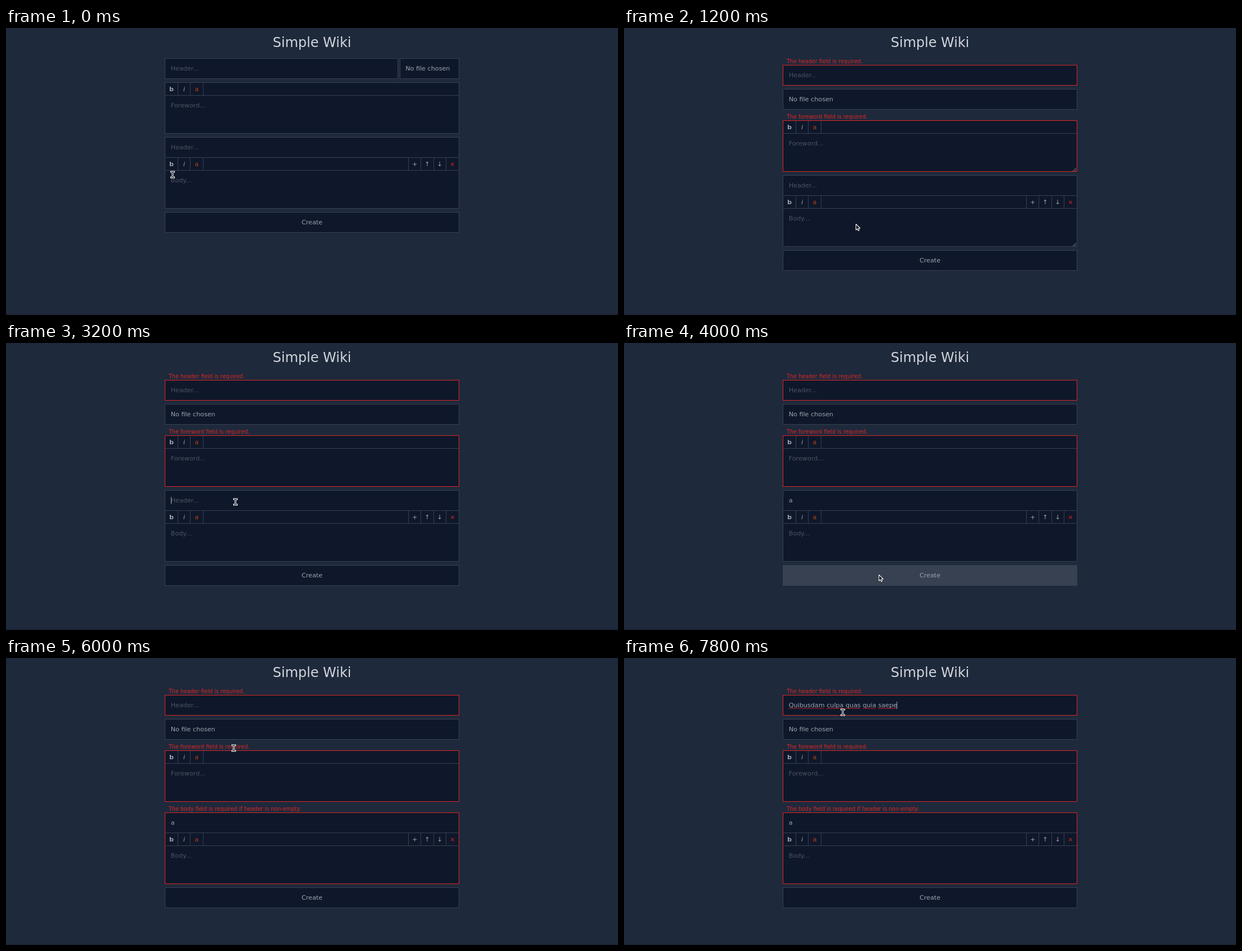
These frames come from a looping animation (1091x513 px, 8 s). An HTML page with a canvas:

```html
<!DOCTYPE html>
<html lang="en">
<head>
<meta charset="utf-8">
<title>Simple Wiki</title>
<style>
  html, body { margin: 0; width: 100%; height: 100%; overflow: hidden; background: #1e293b; }
  canvas { display: block; }
</style>
</head>
<body>
<canvas id="stage" width="1091" height="513"></canvas>
<script>
const ctx = document.getElementById('stage').getContext('2d');
const LOOP = 8000, STEP = 100;
const LEFT = 283, RIGHT = 808, FIELD_H = 37, TEXT_X = 293.7;
const C = {
  page: '#1e293b', field: '#0f172a', line: '#374151', text: '#9ca3af',
  hint: '#4b5563', title: '#d1d5db', red: '#dc2626', orange: '#c2410c'
};
const SENTENCE = 'Quibusdam culpa quas quia saepe';

// Pointer stops: time, x, y, and the shape worn on the way there
const STOPS = [
  [0, 297, 262, 'beam'], [300, 297, 262, 'beam'], [500, 301, 255, 'beam'],
  [800, 396, 326, 'beam'], [1000, 413, 350, 'arrow'], [1800, 413, 350, 'arrow'],
  [2300, 369, 150, 'beam'], [2400, 368, 143, 'arrow'], [2600, 368, 143, 'arrow'],
  [3000, 409, 284, 'beam'], [3400, 409, 284, 'beam'], [3500, 409, 307, 'beam'],
  [3700, 453, 383, 'beam'], [3800, 453, 383, 'beam'], [4000, 454, 414, 'arrow'],
  [4400, 454, 414, 'arrow'], [4800, 454, 414, 'hand'], [5100, 446, 346, 'beam'],
  [5300, 446, 346, 'beam'], [5700, 406, 178, 'beam'], [5900, 406, 178, 'beam'],
  [6000, 406, 161, 'beam'], [6800, 389.5, 96.5, 'beam'], [LOOP, 389.5, 96.5, 'beam']
];

function pointerAt(t) {
  const i = Math.max(1, STOPS.findIndex(s => s[0] >= t));
  const [t0, x0, y0] = STOPS[i - 1], [t1, x1, y1, kind] = STOPS[i];
  const p = (t - t0) / (t1 - t0), e = p * (2 - p);
  return { x: Math.round(x0 + (x1 - x0) * e), y: Math.round(y0 + (y1 - y0) * e), kind };
}

function rect(x, y, w, h, color) {
  ctx.fillStyle = color;
  ctx.fillRect(x, y, w, h);
}

function box(x, y, w, h, border = C.line, fill = C.field) {
  rect(x, y, w, h, border);
  rect(x + 1, y + 1, w - 2, h - 2, fill);
}

function text(str, x, y, color = C.text, { size = 11.2, style = '', align = 'left' } = {}) {
  ctx.font = `${style} ${size}px "DejaVu Sans", sans-serif`;
  ctx.textAlign = align;
  ctx.fillStyle = color;
  ctx.fillText(str, x, y);
}

function error(str, top) {
  text(str, 290, top - 3, C.red, { size: 9.6 });
}

function field(value, hint, top) {
  text(value || hint, TEXT_X, top + 22, value ? C.text : C.hint);
}

function caret(x, top) {
  rect(x, top + 12, 1, 13, C.text);
}

function toolbar(top, withActions) {
  const button = (str, x, color, style) => text(str, x, top + 16, color, { style, align: 'center' });
  rect(LEFT + 1, top + 23, RIGHT - LEFT - 2, 1, C.line);
  button('b', 295, C.text, 'bold');
  button('i', 317.5, C.text, 'italic');
  button('a', 340, C.orange);
  const bars = [306, 328, 351];
  if (withActions) {
    button('+', 728.7, C.text);
    button('↑', 751, C.text);
    button('↓', 773.3, C.text);
    button('×', 796, C.red);
    bars.push(717, 739, 762, 784);
  }
  for (const x of bars) rect(x, top + 1, 1, 22, C.line);
}

function resizeGrip(bottom) {
  ctx.strokeStyle = C.text;
  ctx.lineWidth = 0.8;
  ctx.beginPath();
  for (const d of [6, 3]) {
    ctx.moveTo(806 - d, bottom);
    ctx.lineTo(806, bottom - d);
  }
  ctx.stroke();
}

function squiggles(str, x, y) {
  ctx.strokeStyle = C.red;
  ctx.lineWidth = 1;
  ctx.beginPath();
  for (const word of str.matchAll(/\S+/g)) {
    const from = x + ctx.measureText(str.slice(0, word.index)).width;
    const to = from + ctx.measureText(word[0]).width;
    for (let px = from; px <= to; px++) {
      const py = y + 0.7 * Math.sin((px - from) * Math.PI / 2);
      px === from ? ctx.moveTo(px, py) : ctx.lineTo(px, py);
    }
  }
  ctx.stroke();
}

const ARROW = new Path2D('M.5 .5V11L3 8.8L4.6 12.4L6.4 11.6L4.8 8H8Z');
const BEAM = new Path2D('M-2.5 -5H-1L0 -4L1 -5H2.5M0 -4V4M-2.5 5H-1L0 4L1 5H2.5');
const HAND = new Path2D('M.5 1.5L2 .5L7 2L10.5 5L12 8.5L8 12.5L5 11L2 8L4.5 7.5L2.5 5.5L5 4.8Z');
const FINGERS = new Path2D('M5 4.8L8 6.2M5.5 7L8.5 8M6 9.5L8.5 10');

function pointer({ x, y, kind }) {
  ctx.save();
  ctx.lineJoin = 'round';
  if (kind === 'beam') {
    ctx.translate(x, y);
    ctx.lineCap = 'square';
    ctx.strokeStyle = '#fff';
    ctx.lineWidth = 3;
    ctx.stroke(BEAM);
    ctx.strokeStyle = '#000';
    ctx.lineWidth = 1;
    ctx.stroke(BEAM);
  } else {
    const shape = kind === 'hand' ? HAND : ARROW;
    ctx.translate(x, y);
    ctx.fillStyle = '#000';
    ctx.fill(shape);
    ctx.strokeStyle = '#fff';
    ctx.lineWidth = 1.1;
    ctx.stroke(shape);
    if (kind === 'hand') ctx.stroke(FINGERS);
  }
  ctx.restore();
}

function draw(t) {
  const failed = t >= 1200, failedAgain = t >= 4200;
  const mouse = pointerAt(t);
  const reloading = t >= 4200 && t < 4500 || t >= 1200 && t < 1400;
  const over = top => !reloading && mouse.y >= top && mouse.y < top + FIELD_H;
  const shade = top => over(top) ? C.line : C.field;
  const wide = RIGHT - LEFT;

  const header = failed ? 66 : 54;
  const file = failed ? 109 : 54;
  const foreword = failed ? 165 : 97;
  const section = failedAgain ? 276 : failed ? 263 : 195;
  const create = failedAgain ? 410 : failed ? 397 : 329;
  const alert = failed ? C.red : C.line;

  rect(0, 0, 1091, 513, C.page);
  rect(0, 511, 1091, 2, '#1b2536');
  text('Simple Wiki', 545.5, 34, C.title, { size: 24, align: 'center' });

  // Page header and file picker
  box(LEFT, header, failed ? wide : 416, FIELD_H, alert);
  const fileX = failed ? LEFT : 702;
  box(fileX, file, RIGHT - fileX, FIELD_H, C.line, failed ? shade(file) : C.field);
  text('No file chosen', failed ? TEXT_X : 712.2, file + 22);
  if (t < 6900) field('', 'Header...', header);
  else if (t < 7700) caret(294, header);
  else {
    field(SENTENCE, '', header);
    if (t >= 7800) squiggles(SENTENCE, TEXT_X, header + 24);
    caret(486, header);
  }

  // Foreword
  box(LEFT, foreword, wide, 92, alert);
  toolbar(foreword, false);
  field('', 'Foreword...', foreword + 23);

  // Section
  box(LEFT, section, wide, 128, failedAgain ? C.red : C.line);
  rect(LEFT + 1, section + 36, wide - 2, 1, C.line);
  field(t >= 3300 ? 'a' : '', 'Header...', section);
  if (t >= 3000 && t < 3900) caret(t >= 3300 ? 301 : 294, section);
  toolbar(section + 36, true);
  field('', 'Body...', section + 59);

  box(LEFT, create, wide, FIELD_H, C.line, shade(create));
  text('Create', 545.5, create + 22, C.text, { align: 'center' });

  if (failed) {
    error('The header field is required.', header);
    error('The foreword field is required.', foreword);
  }
  if (failedAgain) error('The body field is required if header is non-empty.', section);

  if (t >= 1200 && t < 1300 || t >= 4200 && t < 4300) {
    resizeGrip(foreword + 91);
    resizeGrip(section + 127);
  }
  if (t < 7300 || t >= 7700) pointer(mouse);
}

const start = performance.now();
function tick() {
  const t = (performance.now() - start) % LOOP;
  draw(Math.floor(t / STEP) * STEP);
  requestAnimationFrame(tick);
}
tick();
</script>
</body>
</html>
```
